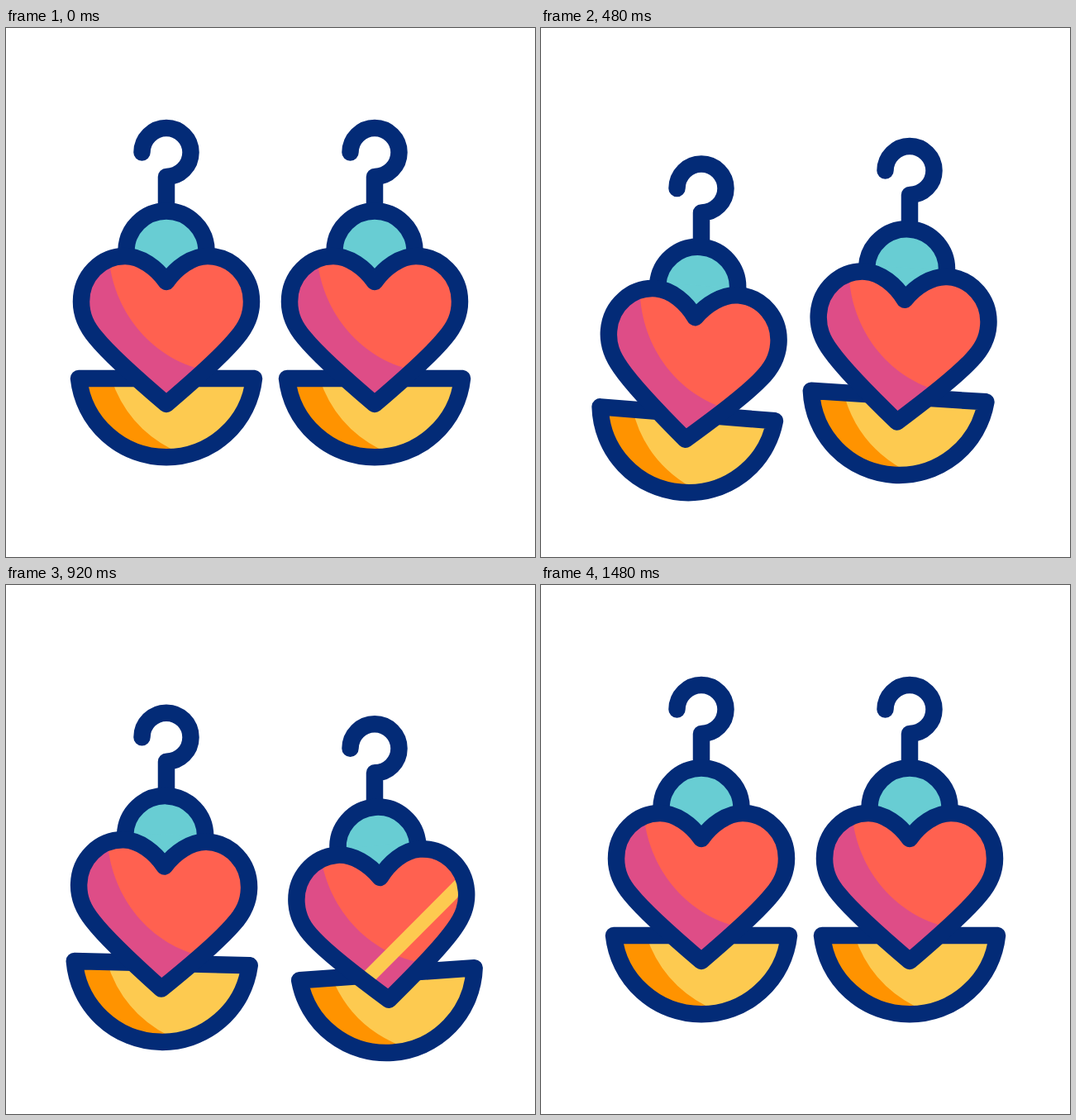
Write an HTML page that moves like this. It is 640x640 px and loops after 1.6 s.

```html
<!DOCTYPE html>
<html lang="en">
<head>
<meta charset="utf-8">
<title>Swinging earrings</title>
<style>
  html, body { margin: 0; height: 100%; overflow: hidden; background: #fff; }
  svg { display: block; width: 100vw; height: 100vh; }
  .line { fill: none; stroke: #032b77; stroke-width: 20.5; stroke-linecap: round; stroke-linejoin: round; }
</style>
</head>
<body>
<svg viewBox="0 0 640 640">
  <defs>
    <path id="hook" d="M164.5 150.5a29.5 29.5 0 1 1 29.5 29.5V220"/>
    <path id="dome" d="M145.5 272V270a48.5 48.5 0 0 1 97 0V272"/>
    <path id="bowl" d="M88 424A106.6 106.6 0 0 0 300 424Z"/>
    <path id="heart" d="M194 307C182 290 163 276 144 276 115 276 91 300 91 331 91 348 97 361 109 375 126 396 160 426 194 455
      228 426 262 396 279 375 291 361 297 348 297 331 297 300 273 276 244 276 225 276 206 290 194 307Z"/>
    <clipPath id="inHeart"><use href="#heart"/></clipPath>
    <clipPath id="inBowl"><use href="#bowl"/></clipPath>
  </defs>
</svg>
<script>
const svg = document.querySelector('svg');
const LOOP = 1600, STEP = 40;

// Keys are [time in ms, value]
const DROP = [[30, 0], [640, 49], [660, 49], [1300, 0]];
const SWING = [[140, 0], [430, 5], [720, -4.3], [993, 2.2], [1270, 0]];
const SHINE = [[560, -180], [860, 165]];

const earring = `
  <g class="earring">
    <use href="#hook" class="line"/>
    <g class="pendant">
      <use href="#dome" fill="#68cdd3"/>
      <path d="M150 268H238L194 307Z" fill="#68cdd3"/>
      <use href="#dome" class="line"/>
      <use href="#bowl" fill="#ff9300"/>
      <path d="M126 420Q145 483 205 512L240 540H320V420Z" fill="#fdca50" clip-path="url(#inBowl)"/>
      <use href="#bowl" class="line"/>
      <use href="#heart" fill="#de4d87"/>
      <g clip-path="url(#inHeart)">
        <path d="M124 270C126 335 170 398 240 414L320 400V260Z" fill="#ff6150"/>
        <rect class="shine" x="-150" y="-8.5" width="300" height="17" fill="#fdca50"/>
      </g>
      <use href="#heart" class="line"/>
    </g>
  </g>`;
svg.insertAdjacentHTML('beforeend', earring + earring);

const earrings = [...svg.querySelectorAll('.earring')].map((root, i) => ({
  root,
  pendant: root.querySelector('.pendant'),
  shine: root.querySelector('.shine'),
  x: i * 252,
  delay: i * 160
}));

// Symmetric cubic ease with handles at (a, 0) and (1 - a, 1)
function ease(x, a = 0.52) {
  let lo = 0, hi = 1;
  for (let i = 0; i < 20; i++) {
    const s = (lo + hi) / 2, r = 1 - s;
    if (3 * a * s * r * r + 3 * (1 - a) * s * s * r + s ** 3 < x) lo = s;
    else hi = s;
  }
  return lo * lo * (3 - 2 * lo);
}

const linear = x => x;

function valueAt(keys, t, curve = ease) {
  if (t <= keys[0][0]) return keys[0][1];
  for (let i = 1; i < keys.length; i++) {
    const [t0, v0] = keys[i - 1], [t1, v1] = keys[i];
    if (t < t1) return v0 + (v1 - v0) * curve((t - t0) / (t1 - t0));
  }
  return keys[keys.length - 1][1];
}

function draw(time) {
  const t = Math.floor((time % LOOP) / STEP) * STEP;
  for (const e of earrings) {
    const local = t - e.delay;
    e.root.setAttribute('transform', `translate(${e.x} ${valueAt(DROP, local)})`);
    e.pendant.setAttribute('transform', `rotate(${valueAt(SWING, local)} 194 215)`);
    e.shine.setAttribute('transform',
      `translate(194 340) rotate(-41) translate(0 ${valueAt(SHINE, local, linear)})`);
  }
}

const start = performance.now();
function tick() {
  draw(performance.now() - start);
  requestAnimationFrame(tick);
}
tick();
</script>
</body>
</html>
```
